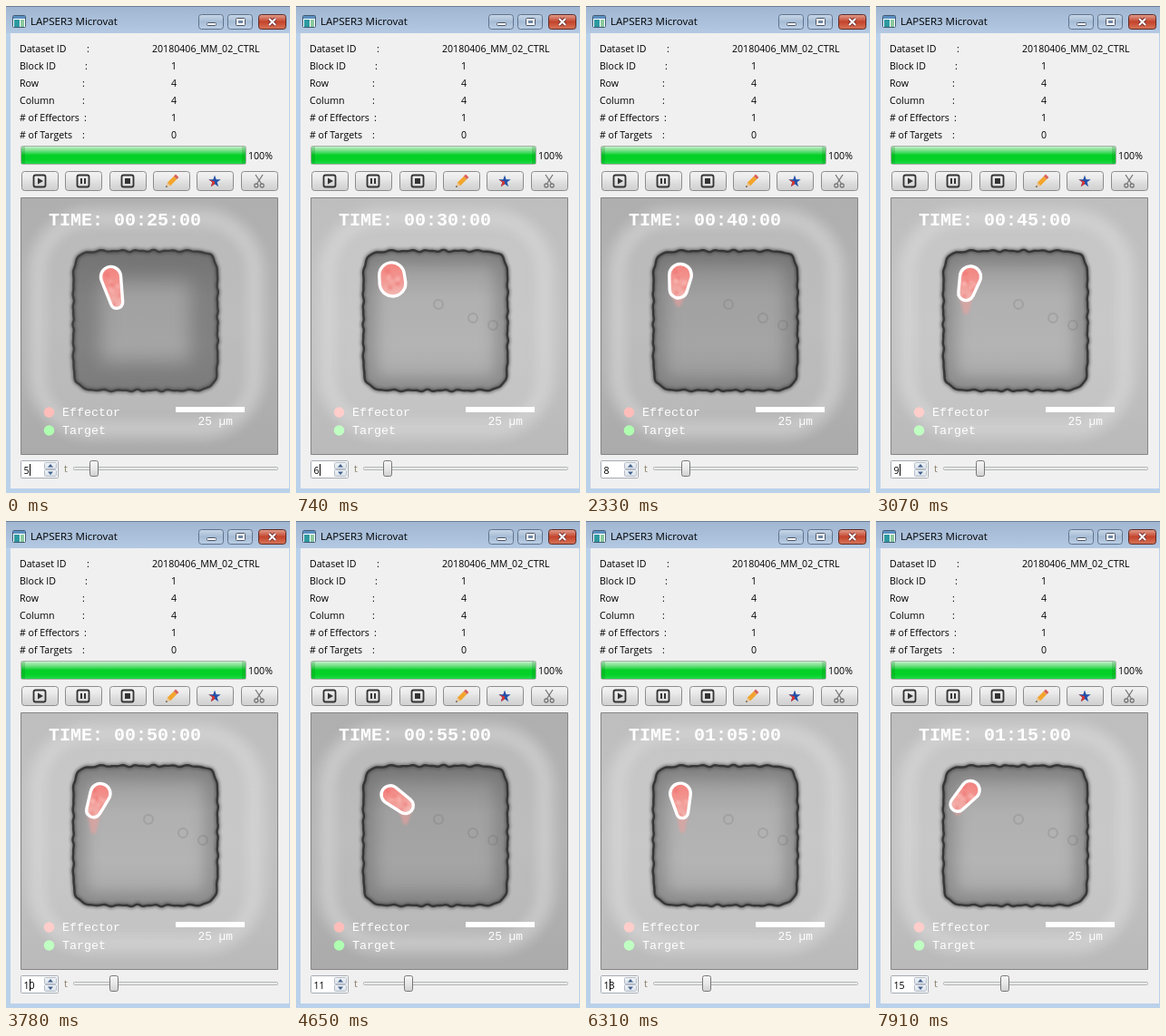
These frames come from a looping animation (313 px wide and 537 px high, 8 s). An HTML page with a canvas:

```html
<!DOCTYPE html>
<html lang="en">
<head>
<meta charset="utf-8">
<title>Well viewer</title>
<style>
html, body { margin: 0; width: 100%; height: 100%; overflow: hidden; }
canvas { display: block; }
</style>
</head>
<body>
<canvas id="stage" width="313" height="537"></canvas>
<script>
const c = document.getElementById('stage').getContext('2d');
const sans = size => `${size}px "Open Sans", "Noto Sans", sans-serif`;
const mono = (size, weight = '') => `${weight} ${size}px "Liberation Mono", monospace`;
const UI = sans(10.6);
const LOOP = 8000, FIRST = 5, CARET = 295;
const starts = [0, 740, 1470, 2200, 3070, 3780, 4650, 5410, 6310, 7020, 7910];
const { sin, cos, exp, abs, PI } = Math;

const grey = (v, a = 1) => `rgba(${v},${v},${v},${a})`;

function rect(x, y, w, h, fill) {
  c.fillStyle = fill;
  c.fillRect(x, y, w, h);
}
function vertical(y, h, ...stops) {
  const g = c.createLinearGradient(0, y, 0, y + h);
  stops.forEach((s, i) => g.addColorStop(i / (stops.length - 1), s));
  return g;
}
function box(x, y, w, h, r, fill, line, width = 1) {
  c.beginPath();
  c.roundRect(x + .5, y + .5, w - 1, h - 1, r);
  if (fill) { c.fillStyle = fill; c.fill(); }
  if (line) { c.strokeStyle = line; c.lineWidth = width; c.stroke(); }
}
function text(s, x, y, font = UI, fill = '#000', align = 'left') {
  c.font = font;
  c.fillStyle = fill;
  c.textAlign = align;
  c.fillText(s, x, y);
}
function disc(x, y, r, fill) {
  c.beginPath();
  c.arc(x, y, r, 0, 7);
  c.fillStyle = fill;
  c.fill();
}
function poly(points, fill) {
  c.beginPath();
  points.forEach(p => c.lineTo(...p));
  c.closePath();
  c.fillStyle = fill;
  c.fill();
}
function soft(path, width, color, blur) {
  c.filter = `blur(${blur}px)`;
  c.lineWidth = width;
  c.strokeStyle = color;
  c.stroke(path);
  c.filter = 'none';
}

// rounded square with a slightly ragged rim
function wellPath() {
  const p = new Path2D(), n = 8.5;
  for (let a = 0; a < 2 * PI; a += PI / 180) {
    const x = cos(a), y = sin(a);
    const r = (abs(x) ** n + abs(y) ** n) ** (-1 / n);
    const rag = .7 * sin(29 * a) + .5 * sin(47 * a + 1);
    p.lineTo(153.7 + x * (79.5 * r + rag * .6), 347 + y * (77 * r + rag));
  }
  p.closePath();
  return p;
}
const well = wellPath();
const halo = new Path2D();
halo.roundRect(33, 232, 243, 236, 62);

// outline around two circles
function hull(x1, y1, r1, x2, y2, r2) {
  const p = new Path2D(), dx = x2 - x1, dy = y2 - y1;
  const dir = Math.atan2(dy, dx);
  const a = Math.acos(Math.min(1, (r1 - r2) / Math.hypot(dx, dy)));
  p.arc(x1, y1, r1, dir + a, dir - a + 2 * PI);
  p.arc(x2, y2, r2, dir - a, dir + a);
  p.closePath();
  return p;
}

function drawWindow() {
  rect(0, 0, 313, 537, '#bad1ea');
  rect(0, 0, 313, 30, vertical(0, 30, '#9fb5d0', '#a9bfda', '#b4c9e2'));
  rect(0, 0, 313, 1, '#6b7f99');
  rect(5, 30, 307, 502, '#f0f0f0');
  box(7, 10, 15, 14, 1, '#fff', '#405a70');
  rect(8, 11, 13, 3, '#5a8fc0');
  rect(9, 15, 6, 8, '#2d9aa0');
  rect(16, 15, 4, 8, '#8cc9a0');
  text('LAPSER3 Microvat', 27, 21, sans(11.5));
  for (const x of [212, 244])
    box(x, 9, 28, 17, 3, vertical(9, 17, '#cbd9e9', '#a6bcd5', '#bdd0e6'), '#5f738d');
  box(278, 9, 31, 17, 3, vertical(9, 17, '#e3a597', '#c4442c', '#d7785c'), '#5c2a25');
  box(221, 18, 11, 4, 1, '#fff', '#4a5568');
  box(253, 13, 11, 9, 1, '#fff', '#4a5568');
  rect(256, 16, 5, 3, '#6f86a3');
  const cross = new Path2D('M290 14l7 7m0-7l-7 7');
  soft(cross, 4, '#733', 0);
  soft(cross, 2, '#fff', 0);
}

function drawInfo() {
  [['Dataset ID', 89, ''], ['Block ID', 87, 1], ['Row', 84, 4], ['Column', 84, 4],
   ['# of Effectors', 86, 1], ['# of Targets', 84, 0]].forEach(([label, colon, value], i) => {
    const y = 51 + 19 * i;
    text(label, 15, y);
    text(':', colon, y);
    text(value, 185, y, UI, '#000', 'center');
  });
  text('20180406_MM_02_CTRL', 161, 51);
  box(16, 154, 249, 21, 2, '#e6e6e6', '#a8b0a8');
  rect(17, 155, 247, 19, vertical(155, 19, '#c4f0ca', '#6fdf82', '#04d028', '#04d028', '#22d848'));
  for (const x of [17, 260]) rect(x, 155, 4, 19, 'rgba(0,110,20,.2)');
  text('100%', 267, 169);
}

function drawButtons() {
  const ink = '#333';
  for (let i = 0; i < 6; i++) {
    const x = Math.round(16.7 + 48.4 * i);
    box(x, 182, 41, 22, 3, vertical(182, 22, '#f4f4f4', '#ebebeb', '#dadada', '#cfcfcf'), '#8c8c8c');
    if (i < 3) box(x + 13, 186, 14, 14, 2, null, ink, 1.8);
  }
  poly([[35, 189.5], [35, 196.5], [41, 193]], ink);
  rect(82, 190, 2, 6, ink);
  rect(86, 190, 2, 6, ink);
  rect(131, 190, 6, 6, ink);

  c.save();
  c.translate(176, 200);
  c.rotate(-PI / 4);
  poly([[0, 0], [5, -2.4], [5, 2.4]], '#e8c79a');
  poly([[0, 0], [2, -1], [2, 1]], ink);
  rect(5, -2.4, 10, 4.8, '#f2a52c');
  rect(15, -2.4, 3, 4.8, '#d9605a');
  c.restore();

  const star = [...Array(10)].map((_, k) => {
    const a = k * PI / 5 - PI / 2, r = k % 2 ? 2.8 : 7;
    return [230 + r * cos(a), 193.5 + r * sin(a)];
  });
  poly(star, '#2450a8');
  poly([...star.slice(5, 9), [230, 193.5]], '#d8352f');

  for (const s of [-1, 1]) {
    const blade = new Path2D();
    blade.moveTo(279 + 4 * s, 186);
    blade.lineTo(279 - 2.5 * s, 196);
    blade.moveTo(281 + 3.2 * s, 198);
    blade.arc(279 + 3.2 * s, 198, 2, 0, 7);
    soft(blade, 1.3, '#777', 0);
  }
}

// The cell rounds up after the first step, tilts steadily, flips over at step 6 and tilts back.
function cellPose(i) {
  const round = i * exp(1 - i), settle = exp(-2 * i);
  const lean = (i < 6 ? 13 - 7 * i : 54 - 24 * (i - 6)) * PI / 180;
  const slant = abs(sin(lean)), reach = 21 - 13 * round + 8 * settle;
  const x = 104 + 11.5 * settle, y = 299 - 3 * cos(2 * PI * (i - 2) / 9);
  return {
    x, y, r: 11.5 + 2.5 * round - 2 * slant,
    footX: x + reach * sin(lean), footY: y + reach * cos(lean),
    footR: 6 + 8 * round + 3 * slant,
    tail: 22 * sin(PI * i / 11) * (1 - round) * cos(lean)
  };
}

function drawCell({ x, y, r, footX, footY, footR, tail }) {
  const body = hull(x, y, r, footX, footY, footR);
  const pink = c.createLinearGradient(x, y - r, footX, footY + footR);
  pink.addColorStop(0, '#f3837f');
  pink.addColorStop(.5, '#f29792');
  pink.addColorStop(1, '#f3b9b4');
  c.filter = 'blur(1.5px)';
  c.fillStyle = 'rgba(235,160,156,.6)';
  c.fill(hull(footX, footY, footR, footX, footY + footR + tail - 3, 3));
  c.filter = 'none';
  c.fillStyle = pink;
  c.fill(body);
  c.save();
  c.clip(body);
  c.filter = 'blur(1.5px)';
  for (let i = 0; i < 9; i++) {
    const k = i / 8;
    disc(x + (footX - x) * k + 6 * sin(i * 4.1), y + (footY - y) * k + 6 * cos(i * 2.7),
      2.3, i % 2 ? 'rgba(236,95,95,.5)' : 'rgba(255,200,195,.5)');
  }
  c.restore();
  soft(body, 3.4, '#fff', 0);
}

function drawPicture(index) {
  const hazy = index === 0, dim = index < 8 && index % 3 === 0;
  const level = dim ? 179 : 194;
  c.save();
  c.beginPath();
  c.rect(17, 212, 282, 282);
  c.clip();
  rect(17, 212, 282, 282, vertical(212, 282, grey(level - 4), grey(level), grey(level - 8)));
  c.filter = 'blur(5px)';
  c.fillStyle = grey(218, .25);
  c.fill(halo);
  soft(halo, 20, grey(228, .38), 6);

  c.fillStyle = vertical(270, 155, grey(level - 44), grey(level - 18), grey(level - 14), grey(level - 26));
  c.fill(well);
  c.save();
  c.clip(well);
  soft(well, hazy ? 60 : 28, grey(hazy ? 95 : 85, hazy ? .5 : .35), hazy ? 10 : 8);
  if (!hazy) for (const [x, y] of [[157, 329], [195, 344], [217, 352]]) {
    const spot = new Path2D();
    spot.arc(x, y, 5, 0, 7);
    soft(spot, 2, grey(90, .18), .7);
  }
  c.restore();
  soft(well, 5.5, grey(60, .5), 1.5);
  soft(well, 2.4, grey(hazy ? 55 : 45, .85), .7);

  drawCell(cellPose(index));
  const minutes = (FIRST + index) * 5;
  const two = n => String(n).padStart(2, '0');
  text(`TIME: ${two(Math.floor(minutes / 60))}:${two(minutes % 60)}:00`, 47, 242, mono(20, 'bold'), '#fff');
  disc(47.5, 448, 5.8, dim ? '#ffbdb9' : '#ffcdca');
  disc(47.5, 468, 5.8, dim ? '#aeffb0' : '#c0ffc2');
  text('Effector', 62, 452, mono(13.33), '#fff');
  text('Target', 62, 472, mono(13.33), '#fff');
  rect(187, 442, 76, 6, '#fff');
  text('25 µm', 211.5, 462, mono(12.8), '#fff');
  c.restore();
  box(16, 211, 284, 284, 0, null, '#858585');
}

function drawControls(index, caret) {
  box(16, 501, 42, 20, 1, '#fff', '#a5abb3');
  text(FIRST + index, 19.5, 516);
  if (caret) rect(26, 505, 1, 13, '#000');
  for (const [y, s] of [[503, -1], [511, 1]]) {
    box(42, y, 14, 8, 1, vertical(y, 8, '#f5f8fb', '#d5dde6'), '#b4bcc6');
    poly([[46, y + 4 - 1.5 * s], [52, y + 4 - 1.5 * s], [49, y + 4 + 2 * s]], '#43618c');
  }
  text('t', 64, 514, UI, '#857a62');
  box(74, 508, 226, 4, 1, '#e7eaea', '#b5b5b5');
  const x = Math.floor(92 + 4.5 * index);
  box(x, 501, 10, 18, 2, vertical(501, 18, '#f7f7f7', '#e8e8e8', '#cfcfcf'), '#777');
}

function frame() {
  const t = performance.now() % LOOP;
  const index = starts.filter(s => s <= t).length - 1;
  // the caret flips on every step, and once more within each even step
  const extra = index % 2 === 0 && t - starts[index] >= CARET;
  const flips = index + Math.ceil(index / 2) + extra;
  drawWindow();
  drawInfo();
  drawButtons();
  drawPicture(index);
  drawControls(index, flips % 2 === 0);
  requestAnimationFrame(frame);
}
frame();
</script>
</body>
</html>
```
